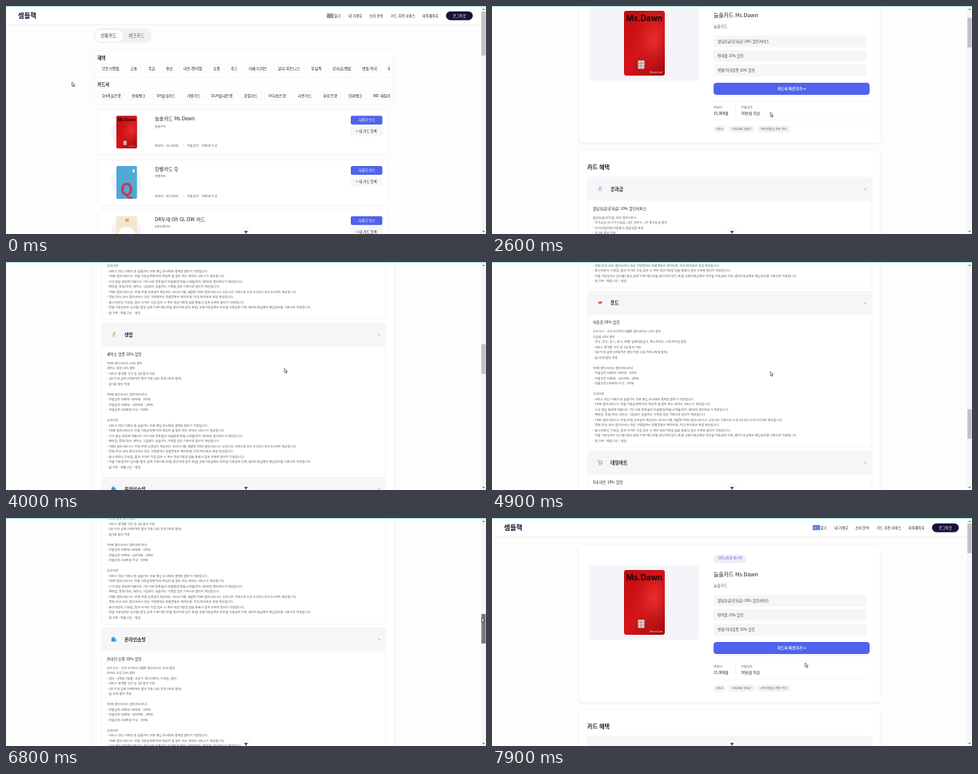
These frames come from a looping animation (600 px wide and 285 px high, 8000 ms). An HTML page:

```html
<!DOCTYPE html>
<html lang="ko">
<head>
<meta charset="utf-8">
<title>카드 혜택</title>
<style>
  html, body { margin: 0; width: 100%; height: 100%; overflow: hidden; background: #fdfdfe; }
  svg { display: block; width: 600px; height: 285px; font-family: "Noto Sans CJK KR", "Noto Sans CJK", sans-serif; }
  text { white-space: pre; }
</style>
</head>
<body>
<svg id="stage" viewBox="0 0 600 285"></svg>
<script>
const LOOP = 8000, VIEW = 285, MAX = 1809;
const INK = '#22222a', GRAY = '#5c5c64', BLUE = '#4f63ee', NAVY = '#17123a', LINE = '#ececef';

const rect = (x, y, w, h, fill, r = 0, more = '') =>
  `<rect x="${x}" y="${y}" width="${w}" height="${h}" rx="${r}" fill="${fill}" ${more}/>`;
const path = (d, fill, more = '') => `<path d="${d}" fill="${fill}" ${more}/>`;
const oval = (x, y, rx, ry, fill, more = '') =>
  `<ellipse cx="${x}" cy="${y}" rx="${rx}" ry="${ry}" fill="${fill}" ${more}/>`;
const edge = (color = LINE) => `stroke="${color}" stroke-width=".6"`;
// y is the middle of the line of text
const text = (x, y, size, str, fill = INK, weight = 400, anchor = 'start') =>
  `<text x="${x}" y="${y + size * .36}" font-size="${size}" fill="${fill}" font-weight="${weight}" text-anchor="${anchor}">${str.replace(/</g, '&lt;')}</text>`;
const mid = (x, y, size, str, fill, weight) => text(x, y, size, str, fill, weight, 'middle');

function header(selection, selectedInk) {
  const nav = [[410.2, '찾기'], [428, '내 가계부'], [454, '소비 분석'], [481, '카드 추천 서비스'], [520.5, '마이페이지']];
  return rect(0, 0, 594, 23.5, '#fff') + rect(0, 23.2, 594, .6, '#ededf0') +
    text(15, 11.7, 8.3, '셈들책', NAVY, 700) +
    rect(401, 9, 8.8, 6.2, selection) + text(401.3, 12, 4.35, '카드', selectedInk, 500) +
    nav.map(([x, s]) => text(x, 12, 4.35, s, INK, 500)).join('') +
    rect(550, 6.7, 33.5, 11, NAVY, 5.5) + mid(566.8, 12.1, 4.5, '로그아웃', '#fff', 500);
}

function redCard(x, y, w, h) {
  return `<g transform="translate(${x} ${y}) scale(${w / 51} ${h / 81})">` +
    rect(0, 0, 51, 81, 'url(#red)', 3) + rect(0, 0, 51, 81, 'url(#shine)', 3) +
    `<text x="25.5" y="13" font-size="9.9" font-weight="700" text-anchor="middle" fill="#1c0505" style="font-family:Inter,sans-serif">Ms.Dawn</text>` +
    rect(17.5, 62, 8, 10.5, '#d9d0cc', 1.2) + path('M17.5 65.5h8M17.5 69h8M21.5 62v10.5', 'none', edge('#8d807c')) +
    text(48, 77, 2.8, 'NeulsolCard', '#fbe4e2', 500, 'end') + '</g>';
}

function listPage() {
  const chips = (y, list) => list.map(([x, w, s]) =>
    rect(x - 5, y - 5.2, w + 10, 10.4, '#fff', 5.2, edge('#f0f0f3')) + text(x, y, 4.7, s, INK, 500)).join('');
  const row = (y, name, maker, fee, perf, art) =>
    rect(115.3, y, 362.4, 56, '#fff', 3, edge()) + oval(150.5, y + 28, 19, 19, '#f5f5f8') + art +
    text(186, y + 11.7, 6.1, name, INK, 500) + text(186, y + 20.7, 3.9, maker, GRAY) +
    text(186, y + 45.5, 3.9, '연회비', GRAY) + text(200, y + 45.5, 3.9, fee, GRAY) +
    rect(221.5, y + 43.5, .5, 4, '#ddd') +
    text(226.5, y + 45.5, 3.9, '전월실적', GRAY) + text(244.5, y + 45.5, 3.9, perf, GRAY) +
    rect(431, y + 7.8, 39.4, 11, BLUE, 1.8) + mid(450.7, y + 13.3, 4.2, '자세히 보기', '#fff', 500) +
    rect(431, y + 21.6, 39.4, 11, '#f7f7f9', 1.8, edge('#f0f0f3')) + mid(450.7, y + 27, 4.4, '+ 내 카드 등록', INK, 500);
  return header('#bdbdbd', INK) +
    rect(109.5, 28, 72.5, 18.3, '#f1f1f4', 9.1) + rect(110.5, 29.3, 36.5, 15.7, '#fff', 7.8, edge('#e2e2e8')) +
    mid(128.3, 37.2, 5.4, '신용카드', INK, 500) + mid(163, 37.2, 5.4, '체크카드', GRAY) +
    rect(110, 56, 374, 67.3, '#fefefe', 2, edge('#f0f0f3')) +
    text(114.3, 64.6, 5.4, '혜택', INK, 700) + text(114.3, 98, 5.4, '카드사', INK, 700) +
    rect(110, 89.6, 374, .5, '#f1f1f4') +
    '<g clip-path="url(#chips)">' +
    chips(78.5, [[120, 22, '모든가맹점'], [155.5, 9, '교통'], [178, 9, '주유'], [200, 9, '통신'],
      [222, 23, '마트/편의점'], [259, 9, '쇼핑'], [281, 9, '푸드'], [303, 23, '카페/디저트'], [340, 29, '뷰티/피트니스'],
      [381.5, 13, '무실적'], [408, 23, '공과금/렌탈'], [445, 19, '병원/약국'], [477, 18, '해외여행']]) +
    chips(112.3, [[120, 23, 'Qn여울은행'], [157, 17, '콩새뱅크'], [188.5, 24, 'VH들녘카드'], [226, 17, '가람카드'],
      [256.5, 28, 'DLM솔내은행'], [297.5, 17, '한별카드'], [328, 23, 'Vt다솜은행'], [365, 17, '라온카드'],
      [396.5, 17, '마루은행'], [428, 17, '모래뱅크'], [459, 27, 'WD 새참카드']]) + '</g>' +
    row(129.5, '늘솔카드 Ms.Dawn', '늘솔카드', '15,000원', '30만원 이상', redCard(138, 137.3, 25.7, 40.7)) +
    row(192.3, '한별카드 Q', '한별카드', '30,000원', '50만원 이상',
      rect(138, 200, 25.7, 41, '#4fa9d6', 1.5) + rect(158, 204, 3, 4, '#cfe2ea', .5) +
      mid(150.8, 229, 21, 'Q', '#c9394c', 700)) +
    row(255, 'DR두레 Oh GL:OW 카드', 'DR두레카드', '15,000원', '40만원 이상',
      rect(138, 262.8, 25.7, 41, '#f6e6cf', 1.5) + rect(149, 266, 4.5, 3.5, '#c9a877', .6) + oval(150.8, 286, 11, 10, '#fff'));
}

const pct = name => [`${name} 10% 할인`];
const use = n => ['- 서비스 영역별 각각 일 1회 할인 적용', '- 1회 이용 금액 1만원까지 할인 적용 (1회 최대 1천원 할인)', `- 월 ${n}회 할인 적용`];
const limits = kind => ['', `${kind} 할인서비스 할인한도안내`, '- 전월실적 30만원~50만원 : 1만원',
  '- 전월실적 50만원 ~100만원 : 2만원', '- 전월실적 100만원 이상 : 3만원', ''];
const ORDER = '- 서비스 대상 거래건 중 늘솔카드 전표 매입 순서대로 결제일 할인이 적용됩니다.';
const NEWBIE = '- 신규 발급 회원에 대해서는 카드사용 등록월의 익월말(등록월+1개월)까지 1만원의 할인한도가 제공됩니다.';
const SPEND = '- 전월 이용실적은 일시불+할부 금액 기준이며 (전월 할인거래 실적 포함) 교통이용금액은 인전월 이용금액 기준, 해외이용금액은 매입일자를 기준으로 적용됩니다.';
const MONTH = '- 월 기준 : 매월 1일 ~ 말일';
const quota = kind => `- ${kind} 할인서비스는 전월 이용금액에 따라 제공된 월 할인 한도 내에서 서비스가 제공됩니다.`;
const timeNotes = [...limits('TIME'), '유의사항', ORDER, quota('TIME'), NEWBIE,
  '- 편의점, 병원/약국, 세탁소, 식음료는 늘솔카드 가맹점 업종 기준으로 할인이 제공됩니다.',
  '- Time 할인서비스는 주중/주말 상관없이 제공되는 서비스이며, Night Time 할인서비스는 승인시간 기준으로 오후 9시부터 오전 9시까지 제공됩니다.',
  '- 병원/약국 10% 할인서비스 대상 가맹점에서 동물병원은 제외되며, 치과/한의원은 포함 제공됩니다.',
  '- 표나라장터, 다모음, 들찬 사이트 직접 접속 시 혹은 대상가맹점 앱을 통해서 접속 시에만 할인이 적용됩니다.',
  SPEND, MONTH];
const weekendNotes = [...limits('주말'), '유의사항', ORDER, quota('주말'), NEWBIE,
  "- 주말 할인서비스는 '토요일/일요일'에 해당되며 토요일/일요일 외 공휴일은 해당되지 않습니다.",
  '- 정유사 공시 기준 휘발유가로 적용되어 할인되며, 등유/경유 거래도 휘발유가 기준으로 환산하여 서비스가 제공됩니다.',
  '- 각 주유소별 유가차이 및 등록에 따라 할인금액 차이가 발생할 수 있습니다.', SPEND, MONTH];
const NIGHT = '오후 9시 ~ 오전 9시까지 Night 할인서비스 10% 할인', TIME = 'TIME 할인서비스 10% 할인';

const items = [
  ['bill', '공과금', '월납요금(공과금) 10% 할인서비스', ['월납요금(공과금) 10% 할인서비스',
    '- 전기요금 /도시가스요금/ JQT, RM Y+, ZT 통신요금 할인', '* 인터넷집전화/이동통신/결합상품 포함', '- 일 1회 할인 적용',
    '- 1회 이용 금액 5만원까지 할인 적용', ...limits('월납요금'), '유의사항', ORDER, quota('월납요금'), MONTH]],
  ['bag', '편의점', '편의점 10% 할인', [TIME, ...pct('편의점 업종'), ...use(5), ...timeNotes]],
  ['bill', '병원/약국', '병원/약국 업종 10% 할인', [TIME, ...pct('병원/약국 업종'), ...use(5), ...timeNotes]],
  ['run', '생활', '세탁소 업종 10% 할인', [TIME, ...pct('세탁소 업종'), ...use(5), ...timeNotes]],
  ['bag', '온라인쇼핑', '온라인 쇼핑 10% 할인', [NIGHT, ...pct('온라인 쇼핑'), '- 담터, 나래장, AB몰, 고샅가, 표나라장터, 다모음, 들찬', ...use(10), ...timeNotes]],
  ['run', '교통', '택시 업종 10% 할인', [NIGHT, ...pct('택시 업종'), ...use(10), ...timeNotes]],
  ['sushi', '푸드', '식음료 10% 할인', [NIGHT, ...pct('식음료'), '- 한식, 양식, 일식, 중식, 뷔페, 일반대중음식, 패스트푸드, 커피전문점 업종', ...use(10), ...timeNotes]],
  ['cart', '대형마트', '3대 마트 10% 할인', ['주말할인서비스', ...pct('3대 마트'), '- 일 1회', '- 1회 이용 금액 5만원까지 할인 적용', '- 월 10회 할인 적용', ...weekendNotes]],
  ['cart', '주유', '4대 정유사 리터당 60원 할인', ['주말할인서비스', '4대 정유사 리터당 60원 할인', '- 해울에너지/모란정유/가온오일/너울오일뱅크',
    '- 휘발유, 등유, 경유(LPG 제외)', '- 일 1회', '- 1회 이용 금액 10만원까지 할인 적용', '- 월 이용 금액 30만원까지 할인 적용', ...weekendNotes]],
  ['bag', '온라인쇼핑', '풀내음몰 20% 할인', ['건강한 라이프스타일 푸드 풀내음몰(www.shopintake.com) 결제 시 20% 할인',
    '- 전월 이용금액 (일시불+할부) 유실적 고객님께 월 4회까지 20% 할인이 제공됩니다.',
    '- 신규 발급 회원에 대해서는 카드사용 등록월의 익월말(등록월+1개월)까지 실적과 관계없이 할인이 제공됩니다.',
    '- 풀내음몰 직접 접속 시에만 할인이 적용됩니다.',
    "- <결제수단 선택> 화면에서 '늘솔 Ms.Dawn 카드'를 선택하셔야 할인 적용이 됩니다. (일반 결제나 간편 결제로 진행하는 경우 할인 적용 불가)", MONTH]]
];

const icons = {
  bill: rect(-2.6, -3.6, 5.4, 7, '#dfe3f3', .8) + path('M-1.4-1.6h3M-1.4 0h3M-1.4 1.6h2', 'none', edge('#7d86b5')),
  run: oval(.8, -2.8, 1.2, 1.2, '#e9b44c') + path('M.5-1.2-.8 1 1 2v2M-.8 1-2.8 3M-2.6-.6.5-1.2 2.6.4', 'none', 'stroke="#c9a25c" stroke-width=".9"'),
  bag: path('M-3.4-2.2h5l.6 5.6h-6z', '#3c8fd8') + path('M-2-2.2q1-2.6 2.2 0', 'none', edge('#2b6fae')) + rect(.6, 0, 3, 3.4, '#67c3d6', .4),
  sushi: oval(0, 1, 3.4, 1.8, '#f3ece4') + path('M-3.4 0Q-1-3 3.4-1.4 3 2-1 1.2z', '#e2573d'),
  cart: path('M-3.6-3h1.4l1 4.4h3.8l.8-3.2h-5.3', 'none', 'stroke="#8b8f98" stroke-width=".8"') + oval(-.6, 2.8, .7, .7, '#777') + oval(2, 2.8, .7, .7, '#777')
};

function accordion() {
  const GAP = 4;
  let y = 273, out = '';
  items.forEach(([icon, name, title, lines]) => {
    const h = 52.5 + 6.5 * lines.length;
    out += rect(119.3, y, 355.4, h, '#fff', 3, edge('#eeeef1')) +
      path(`M119.3 ${y + 29.5}v-26.5q0-3 3-3h349.4q3 0 3 3v26.5z`, '#f6f6f8') +
      `<g transform="translate(135 ${y + 14.5}) scale(.88)">${icons[icon]}</g>` +
      text(148, y + 14.8, 5.8, name, INK, 700) +
      path(`M465.2 ${y + 14.2}l1.3 1.3 1.3-1.3`, 'none', edge('#777')) +
      text(126, y + 39, 4.7, title, INK, 500) +
      lines.map((s, i) => s && text(126, y + 50.2 + i * 6.5, 3.84, s, GRAY)).join('');
    if (name === '주유') out += rect(119.5, y, 355, h, 'none', 3, 'id="focus" stroke="#8c8c94" stroke-width=".7"');
    y += h + GAP;
  });
  return out;
}

function detailPage() {
  const feature = (y, s) => rect(277, y, 191, 14.6, '#f6f6f9', 2) + text(282, y + 7.3, 4.5, s, '#45454d');
  const tag = (x, w, s) => rect(x, 208.6, w, 8.4, '#f2f2f5', 4.2) + mid(x + w / 2, 212.8, 3.7, s, GRAY);
  const panel = (y, h) => rect(109.3, y, 375, h, '#fff', 4, 'filter="url(#soft)"');
  return header('#3f6fe0', '#fff') + panel(34, 196) + panel(240, MAX + 35.5) +
    rect(122, 58.8, 137, 93.6, '#f5f5f9', 4) + redCard(165, 65, 51, 81) +
    rect(277, 45.8, 41, 10.4, '#ededfb', 5.2) + mid(297.5, 51, 4, '최대 5만원 캐시백', '#6a63cf', 400) +
    text(277, 70.8, 6.8, '늘솔카드 Ms.Dawn', INK, 500) + text(277, 84.6, 4.7, '늘솔카드', GRAY) +
    feature(95.8, '월납요금(공과금) 10% 할인서비스') + feature(114, '편의점 10% 할인') + feature(132.2, '병원/약국업종 10% 할인') +
    rect(277, 155, 195, 15, BLUE, 4, 'filter="url(#soft)"') + mid(374.5, 162.4, 4.6, '카드사 바로가기→', '#fff', 700) +
    rect(277, 178, 195, .5, '#efeff2') + rect(277, 201.3, 195, .5, '#efeff2') + rect(304, 181.5, .5, 15, '#e4e4e8') +
    text(277, 185.4, 3.9, '연회비', GRAY) + text(277, 193, 4.7, '15,000원', INK, 500) +
    text(311.3, 185.4, 3.9, '전월실적', GRAY) + text(311.3, 193, 4.7, '30만원 이상', INK, 500) +
    tag(277, 15, 'ZELA') + tag(295.5, 33, 'ONLINE ONLY') + tag(331.5, 41.5, '온라인발급 전용 카드') +
    text(119, 260.5, 7.1, '카드 혜택', INK, 700) + accordion();
}

const stage = document.getElementById('stage');
stage.innerHTML = `<defs>
  <linearGradient id="red" x2="1" y2="1"><stop stop-color="#c00d10"/><stop offset=".5" stop-color="#d8141a"/><stop offset="1" stop-color="#9c080c"/></linearGradient>
  <radialGradient id="shine" cx=".75" cy=".45" r=".7"><stop stop-color="#ff4a44" stop-opacity=".55"/><stop offset="1" stop-color="#a00" stop-opacity="0"/></radialGradient>
  <clipPath id="chips"><rect x="112" y="60" width="368" height="62"/></clipPath>
  <filter id="soft" x="-5%" y="-10%" width="110%" height="125%"><feDropShadow dx="0" dy=".8" stdDeviation="1.6" flood-color="#32325a" flood-opacity=".1"/></filter>
</defs>` + rect(0, 0, 600, VIEW, '#fdfdfe') +
  `<g id="list">${listPage()}</g><g id="detail">${detailPage()}</g>` +
  oval(300, 283, 6, 6, '#fff', edge('#e4e4e8')) + path('M297.6 281h4.8l-2.4 4z', '#55555c') +
  rect(594, 0, 6, VIEW, '#f6f6f7') + rect(594.3, 7, 5.3, 37, '#c1c1c1', 0, 'id="thumb"') +
  path('M595.5 5h3l-1.5-2zM595.5 281h3l-1.5 2z', '#6a6a6a') + rect(0, 0, 600, 1, '#a9dfe0') +
  path('M0 0v5.2l1.2-1.1.9 2 .9-.4-.9-1.9h1.7z', '#fff', 'id="cursor" stroke="#222" stroke-width=".55"');

const [list, detail, thumb, cursor, focusRing] =
  ['list', 'detail', 'thumb', 'cursor', 'focus'].map(id => document.getElementById(id));

const OPEN = 1000, GRAB = 6400, DROP = 7500;
const scrollKeys = [[0, 0], [2500, 0], [2600, 59], [2700, 245], [3300, 430], [4000, 737], [4300, 1040], [4400, 1040],
  [4700, 1310], [4800, 1310], [4900, 1362], [5700, MAX], [GRAB, MAX], [6800, 869], [7300, 250], [DROP, 0]];
const cursorKeys = [[0, 82.5, 95], [900, 449, 142], [OPEN, 449, 142], [2400, 348, 133], [4700, 348, 133], [4900, 348, 137],
  [5300, 348, 137], [5700, 388, 169], [5900, 388, 169], [6300, 594.5, 247], [DROP, 594.5, 12], [7900, 391.5, 181]];

function at(keys, t, col = 1) {
  const i = keys.findIndex(k => k[0] > t);
  if (i < 0) return keys[keys.length - 1][col];
  const a = keys[i - 1], b = keys[i];
  return a[col] + (b[col] - a[col]) * (t - a[0]) / (b[0] - a[0]);
}

function draw(t) {
  const opened = t >= OPEN, drag = t >= GRAB && t < DROP;
  const y = Math.round(at(scrollKeys, t)), top = 7 + y / MAX * 235;
  list.style.display = opened ? 'none' : '';
  detail.style.display = opened ? '' : 'none';
  detail.setAttribute('transform', `translate(0 ${-y})`);
  focusRing.style.display = t >= 5700 && t < 6500 ? '' : 'none';
  thumb.setAttribute('y', top);
  thumb.setAttribute('height', opened ? 37 : 55);
  thumb.setAttribute('fill', drag ? '#787878' : '#c1c1c1');
  const cy = drag ? top + 5 : at(cursorKeys, t, 2);
  cursor.setAttribute('transform', `translate(${at(cursorKeys, t)} ${cy})`);
}

const start = performance.now();
let last = -1;
function tick() {
  const t = Math.floor((performance.now() - start) % LOOP / 100) * 100;
  if (t !== last) draw(last = t);
  requestAnimationFrame(tick);
}
draw(0);
tick();
</script>
</body>
</html>
```
